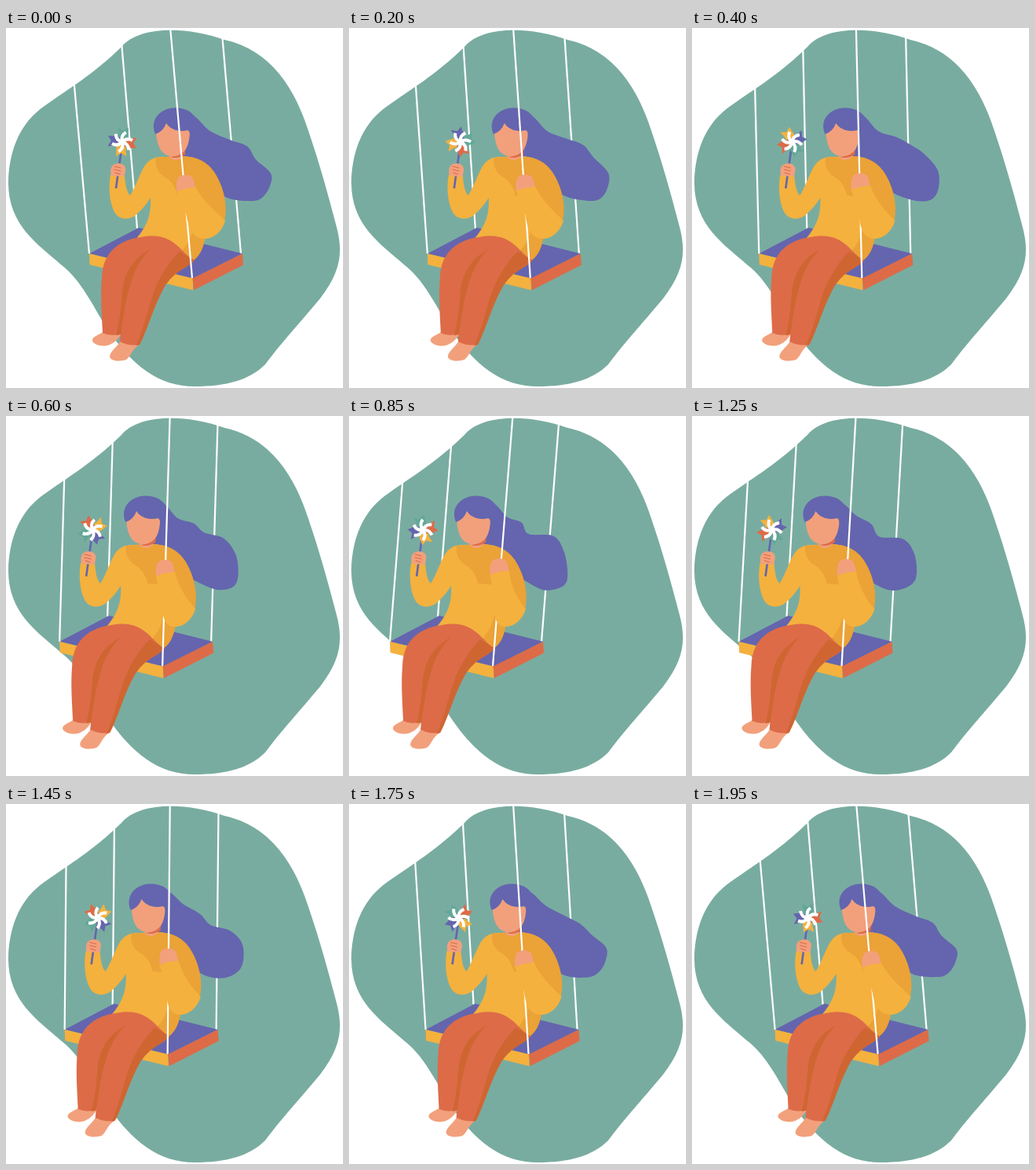
Recreate the animation shown at these times as an HTML page. Size 429 by 458 pixels, loop 2000 ms.

```html
<!DOCTYPE html>
<html lang="en">
<head>
<meta charset="utf-8">
<title>Swing</title>
<style>
  html, body { margin: 0; width: 100%; height: 100%; overflow: hidden; background: #fff; }
  svg { display: block; width: 429px; height: 458px; }
  .purple { fill: #6465ae; } .yellow { fill: #f4b13e; } .amber { fill: #eba236; }
  .orange { fill: #dd6b48; } .rust { fill: #cf6632; } .skin { fill: #f2a07c; }
  .teal { fill: #62a898; }
  .rope { stroke: #fff; stroke-width: 2.2; }
  .crease { fill: none; stroke: #dd6b48; stroke-width: 1.2; stroke-linecap: round; }
  .vane { fill: none; stroke: #fff; stroke-width: 4; }
</style>
</head>
<body>
<svg viewBox="0 0 429 458">
  <path fill="#79aca0" d="M3 195C4 160 15 125 45 102C80 77 110 60 147 24C170 -3 230 -2 278 15C338 28 368 78 385 131C400 175 410 212 420 250C430 285 426 310 400 344C370 380 355 395 330 428C310 448 280 456 240 456C195 456 160 430 127 380C110 352 95 320 70 301C40 275 2 250 3 195Z"/>
  <line class="rope"/>
  <line class="rope"/>

  <g class="rider">
    <path id="hair" class="purple"/>
    <path class="purple" d="M106 287L169 254L301 287L238 319Z"/>
    <path class="yellow" d="M106 287L238 318.500V333.500L106.500 301Z"/>
    <path class="orange" d="M237.500 318.500L301 287L302 301.500L239 333.500Z"/>

    <!-- jumper -->
    <path class="yellow" d="M198 164C187 164 180 169 175 178C168 191 164 204 158 213C153 208 152 198 151 188L133 187C130 203 132 223 138 234C143 244 157 245 165 238Q176 229 184 216C185 237 180 252 165 269L200 285L238 296C251 286 253 271 255 250L266 190C256 172 245 164 225 163Z"/>
    <path class="amber" d="M191 165C189 176 194 185 203 190C211 195 216 203 218 213L240 215L241 245C238 262 232 275 222 286L238 296C250 288 252 274 255 262L278 246C283 226 277 201 265 183C254 167 238 163 222 163Z"/>

    <!-- feet and trousers -->
    <path class="skin" d="M123 387C117 391 109 393 110 398C112 404 125 406 132 403C138 400 142 397 146 390Z"/>
    <path class="skin" d="M146 397C144 404 132 411 132 418C133 425 148 424 153 422C159 418 160 409 169 403Z"/>
    <path class="orange" d="M172 266C148 269 123 282 122 318C120 341 122 365 123 388Q134 393 146 389L145 399Q157 405 170 403C181 382 189 350 203 327Q212 313 231 303L240 296C220 284 213 258 172 266Z"/>
    <path class="rust" d="M184 281C163 293 151 309 148 335C146 357 145 372 140 391L146 390C150 365 152 345 159 324C164 307 172 293 184 281Z"/>
    <path class="rust" d="M221 284C205 300 192 322 185 345C179 365 174 385 166 404L170 403C181 382 189 350 203 327Q212 313 231 303L240 296Z"/>

    <!-- pinwheel and the hand holding it -->
    <path d="M148 147L140 204" stroke="#6465ae" stroke-width="2.6"/>
    <g id="wheel"></g>
    <path class="skin" d="M134 188C132 181 134 174 139 173C144 171 151 173 152 178C153 182 151 185 151 189Z"/>
    <path class="crease" d="M138 176L146 178M138 180L146 182M139 184L145 186"/>

    <!-- head -->
    <path class="skin" d="M208 155V165Q215 172 225 164L226 150Z"/>
    <path class="orange" d="M209 164C219 163 225 159 229 151L228 161Q218 167 209 164Z"/>
    <path class="skin" d="M191 127C191 149 197 163 212 163C227 163 234 151 234 130L220 114H200Z"/>
    <path class="purple" d="M190 135C185 123 189 112 199 106C212 98 231 101 239 111C244 117 246 122 248 126L234 136Q234 131 231 130C220 133 209 129 204 121Q200 132 190 135Z"/>
  </g>

  <line class="rope"/>
  <line class="rope"/>
  <g class="rider">
    <path id="forearm" class="yellow"/>
    <path id="hand" class="skin" d="M217 208C217 203 216 197 219 191C222 186 234 186 237 190C240 195 240 200 241 203Q229 203 217 208Z"/>
  </g>
</svg>
<script>
const LOOP = 2000, STEP = 50, PEAK = 975, REACH = 56.5;
const $ = id => document.getElementById(id);
const riders = document.querySelectorAll('.rider');
const lines = document.querySelectorAll('.rope');

// pivot x, pivot y, seat x, seat y
const ropes = [
  [139, -77, 167, 255],
  [271, -40, 299, 287],
  [77.5, -33, 106, 287],
  [208.8, -4, 237, 318]
];

// Outer edge of the hair: mean x, mean y, and how far each point leans with the swing.
const strand = [
  [239, 112, 0, 0], [257, 129, 2, 4], [279, 139, 6, 6], [294, 151, 13, 0], [316, 160, 2, 5],
  [332, 178, 5, 4], [334, 200, 2, 0], [327, 215, 0, 2], [308, 221, 5, 2], [281, 214, 0, 3]
];
const scalp = [[255, 195], [236, 170], [222, 160], [222, 115]];

const smooth = u => u * u * (3 - 2 * u);
const bezier = (u, a, b) => 3 * u * (1 - u) ** 2 * a + 3 * u * u * (1 - u) * b + u ** 3;

// Closed Catmull-Rom curve through the points.
function smoothPath(points) {
  const n = points.length;
  const p = i => points[(i + n) % n];
  const curves = points.map((b, i) => {
    const a = p(i - 1), c = p(i + 1), e = p(i + 2);
    const c1 = b.map((v, k) => v + (c[k] - a[k]) / 6);
    const c2 = c.map((v, k) => v - (e[k] - b[k]) / 6);
    return `C${c1} ${c2} ${c}`;
  });
  return `M${points[0]}${curves.join('')}Z`;
}

function swing(t) {
  const out = t < PEAK ? smooth(t / PEAK) : 1 - smooth((t - PEAK) / (LOOP - PEAK));
  return -REACH * out;
}

// The hair leans with the swing while a small ripple runs along it.
function hairPath(t) {
  const phase = 2 * Math.PI * t / LOOP, lean = Math.cos(phase);
  const edge = strand.map(([x, y, leanX, leanY], i) =>
    [x + leanX * lean, y + leanY * lean + (i && 3 * Math.sin(phase - i))]);
  return smoothPath([...edge, ...scalp]);
}

// Points near the wrist follow the hand fully, those near the elbow stay.
function forearmPath(sx, sy) {
  const p = (x, y, k) => `${x + sx * k} ${y + sy * k}`;
  return `M${p(217, 208, 1)}C${p(222, 220, 0.8)} ${p(228, 230, 0.65)} ${p(230, 240, 0.5)}` +
    `C${p(232, 252, 0.4)} ${p(237, 268, 0.1)} 252 268C264 269 276 258 279 245` +
    `C270 236 ${p(252, 222, 0.5)} ${p(241, 202, 1)}Q${p(229, 202, 1)} ${p(217, 208, 1)}Z`;
}

function draw(t) {
  const dx = swing(t);
  riders.forEach(g => g.setAttribute('transform', `translate(${dx})`));
  ropes.forEach(([x1, y1, x2, y2], i) =>
    Object.entries({ x1, y1, x2: x2 + dx, y2 }).forEach(([k, v]) => lines[i].setAttribute(k, v)));

  $('hair').setAttribute('d', hairPath(t));

  // The hand follows the rope, which moves less than the seat.
  const sx = -0.31 * dx, sy = 0.11 * dx;
  $('forearm').setAttribute('d', forearmPath(sx, sy));
  $('hand').setAttribute('transform', `translate(${sx} ${sy})`);

  const spin = 720 * bezier(t / LOOP, 0.29, 0.87);
  $('wheel').setAttribute('transform', `translate(148 145) rotate(${spin})`);
}

const part = (cls, angle, d) => `<path class="${cls}" transform="rotate(${angle})" d="${d}"/>`;
const ring = (count, make) => Array.from({ length: count }, (_, i) => make(i, i * 360 / count)).join('');
const colors = ['orange', 'yellow', 'purple', 'teal'];
$('wheel').innerHTML =
  ring(4, (i, angle) => part(colors[i], 18 + angle, 'M4 4L9 5L19.5 2L14 -3L16 -11L8 -7L5 -7Z')) +
  ring(6, (i, angle) => part('vane', angle, 'M0 0Q6 -6 13 -2'));

const start = performance.now();
function tick() {
  const t = (performance.now() - start) % LOOP;
  draw(Math.floor(t / STEP) * STEP);
  requestAnimationFrame(tick);
}
tick();
</script>
</body>
</html>
```
